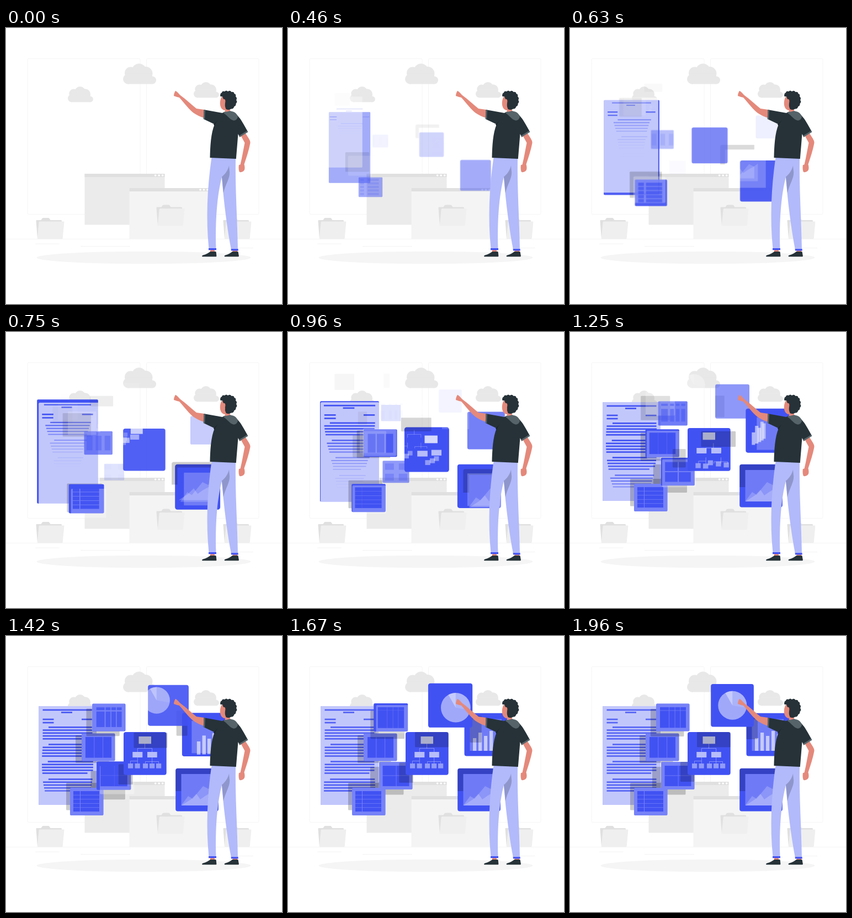
These frames come from a looping animation (500 px wide and 500 px high, 2 s). An HTML page:

```html
<!DOCTYPE html>
<html lang="en">
<head>
<meta charset="utf-8">
<title>Data panels</title>
<style>
html, body { margin: 0; width: 100%; height: 100%; overflow: hidden; background: #fff; }
svg { display: block; width: 100vw; height: 100vh; }
</style>
</head>
<body>
<svg viewBox="0 0 500 500" xmlns="http://www.w3.org/2000/svg">
  <defs>
    <g id="cloud">
      <circle cx="9" cy="28" r="9"/><circle cx="14" cy="17" r="11"/><circle cx="29" cy="13" r="13"/>
      <circle cx="41" cy="18" r="12.5"/><circle cx="53" cy="30" r="7"/>
      <rect x="8" y="18" width="45" height="19"/>
    </g>
    <g id="folder">
      <path fill="#e0e0e0" d="M54.5 349q0-1 1-1h8l2-3q.5-1 2-1h9q1.500 0 2 1l2 3h19q1.500 0 1.500 1.500l-3 31.500h-40q-1 0-1.200-1.200z"/>
      <path fill="#efefef" d="M61.500 350.500h43q1 0 .9 1.200l-2.700 29q-.2 1.300-1.500 1.300h-43.500q-1.200 0-1-1.300l3-29q.2-1.200 1.800-1.200z"/>
    </g>
  </defs>

  <g fill="none" stroke="#f5f5f5">
    <rect x="39" y="55.500" width="204" height="282" rx="2"/>
    <rect x="254.500" y="55.500" width="203.500" height="282" rx="2"/>
    <path stroke="#ebebeb" stroke-width=".6" d="M0 382.300H500M53 391H97M135 395.500H225M420 398.500H448"/>
  </g>
  <ellipse cx="249.500" cy="416" rx="194" ry="11.300" fill="#f5f5f5"/>
  <g fill="#e8e8e8">
    <use href="#cloud" x="212" y="64.500"/>
    <use href="#cloud" transform="translate(112 106) scale(.765)"/>
    <use href="#cloud" transform="translate(340 98) scale(.765)"/>
  </g>
  <path fill="#ebebeb" d="M142.500 264h145v92.500h-145z"/>
  <path fill="#e0e0e0" d="M142.500 264h145v6h-145z"/>
  <path fill="#f4f4f4" d="M223.500 290h145v92h-145z"/>
  <path fill="#e0e0e0" d="M223.500 290h145v6h-145z"/>
  <g fill="#fff">
    <circle cx="270.700" cy="267" r="1.800"/><circle cx="277.200" cy="267" r="1.800"/><circle cx="283.700" cy="267" r="1.800"/>
    <circle cx="352" cy="293" r="1.800"/><circle cx="358.500" cy="293" r="1.800"/><circle cx="365" cy="293" r="1.800"/>
  </g>
  <use href="#folder"/>
  <use href="#folder" x="218" y="-23.500"/>
  <use href="#folder" x="339"/>

  <g id="panels"></g>

  <g id="man">
    <path fill="#e4897b" d="M370 400h8v6h-8zM411 402h8v5h-8z"/>
    <path fill="#263238" d="M370 405h9.500q1 0 1.200 1l.7 7q0 1.200-1.200 1.200h-24.500q-1.500-1.700.8-2.500c6-1.600 9-3.200 13.500-6.700zM410 405h9.500q1 0 1.200 1l1.200 7q0 1.200-1.200 1.200h-24.500q-1.500-1.700.8-2.500c6-1.600 8.500-3.200 13-6.700z"/>
    <path fill="#b2bafb" d="M372.500 234C364.500 290 362 345 367.500 400H380.500C379 350 382 305 391 270C394 310 400 360 408 402H420C419 345 415 290 416 235z"/>
    <path fill="#8f96cb" d="M404 249.500C402 258 396 266 391 269.500L394 299C397 284 405 274 405.200 262z"/>
    <path fill="#4152f3" d="M367 399h14v3.200h-14zM407.500 400.200h13.200v3.400h-12.500z"/>
    <path fill="#e4897b" d="M426 196L434 191C439 199 443 204 442.500 208C440 222 435 236 431.500 247C433 252 433 257 430.500 259C427 261.500 423.500 262 422.500 260C421 255 421.500 251 422 248L424.500 247.500C428 233 430 220 432.500 208z"/>
    <path fill="#e4897b" d="M359 148L345 146C336 139 326 129 316 122C313 119 310 115.500 307 113.800C305.500 116 304 120 304 123C308 124.500 312 125.500 314 126C323 136 332 148 340 154C346 158 352 161 359 163z"/>
    <path fill="#263238" d="M358.500 148L392 154C397 150.500 404 149.500 410 152C417 155 420 159 424 164C430 173 435 182 438 188L423.500 197.500L420.500 192L416.800 237L369.500 235C370 215 371 190 378 174.500L358 165z"/>
    <path fill="#566469" d="M358.500 148l2.500.5-.8 17.300-2.700-1.100zM437 186l1.400 2.500-15 9.300-1.400-2.600z"/>
    <path fill="#1c262b" d="M384 167q-4 4-6 11l-2-3.500z"/>
    <path fill="#566469" d="M394 154C396 150 404 149 409 151C415 152 419 156 420 161C419 165 416 168 412 167.500C405 166 400 157 394 154z"/>
    <path fill="#e4897b" d="M391 124C387.500 130 387 138 389 143C390.500 147 394 149 397 149L396.500 152Q401 152 406 150L404 130z"/>
    <path fill="#263238" d="M388.500 124Q387 119 391 117Q392 113.500 396 115Q399 112 402 115Q406 112 408.500 116Q413 115 413.500 119Q417.500 120 416 124Q419.500 127 417 130.500Q420 134 416.500 137Q417 141 413.500 142Q412 147 408 146.500Q403 149.500 398.500 147Q396 142 397 137L392 124z"/>
    <ellipse cx="394.800" cy="133" rx="2.600" ry="4.200" fill="#e4897b"/>
  </g>
</svg>
<script>
const NS = 'http://www.w3.org/2000/svg';
const BLUE = '#4152f3', WHITE = '#fff', SHADE = .2;
const parts = [];

function make(parent, tag, attrs) {
  const el = document.createElementNS(NS, tag);
  for (const k in attrs) el.setAttribute(k, attrs[k]);
  return parent.appendChild(el);
}

// Registers a zoom-in about (x, y), starting after delay seconds.
function zoom(el, delay, x = 0, y = 0, alpha = 1) {
  parts.push({ el, delay, x, y, alpha });
  return el;
}

const group = (x, y) => zoom(make(document.getElementById('panels'), 'g', {}), 0, x, y);

const box = (g, [x1, y1, x2, y2], fill, rx = 0) =>
  make(g, 'rect', { x: x1, y: y1, width: x2 - x1, height: y2 - y1, fill, rx });

// Grows about its own centre.
const centred = (g, r, delay, fill = BLUE, rx = 0) =>
  zoom(box(g, r, fill, rx), delay, (r[0] + r[2]) / 2, (r[1] + r[3]) / 2);

// Grows from the stage corner.
const flown = (g, r, delay, fill, alpha, rx = 0) => zoom(box(g, r, fill, rx), delay, 0, 0, alpha);
const flownPath = (g, d, delay, fill, alpha) => zoom(make(g, 'path', { d, fill }), delay, 0, 0, alpha);
const shade = (g, r, delay) => flown(g, r, delay, '#000', SHADE, 1.5);

// Text document
const doc = group(111.7, 216.5);
const page = [59, 127, 164, 306];
centred(doc, page, 0, BLUE, 2);
flown(doc, page, 0, WHITE, .68, 2);
const lines = make(doc, 'g', {});
const line = (x1, x2, y, delay) => centred(lines, [x1, y - 1.3, x2, y + 1.3], delay);
line(66.5, 156.5, 134, .21);
line(100, 120, 138.500, .21);
line(66.5, 86.5, 151, .08);
line(137, 156.5, 151, .1);
line(66.5, 86.5, 157, .12);
let row = 0;
for (const top of [165.3, 196.5, 227.5, 259.5])
  for (let i = 0; i < 5; i++) {
    const short = top === 227.5 && i === 4;
    line(i ? 66.5 : 77, short ? 147 : 156.5, top + i * 5.25, .235 + .034 * row++);
  }

// Tables
const left = group(167.5, 224);
function table(x, y, delay, cols, rows) {
  const r = [x, y, x + 60.5, y + 50];
  centred(left, r, delay, BLUE, 2);
  flown(left, r, delay, WHITE, .28, 2);
  for (const [x1, x2] of cols)
    for (const [y1, y2] of rows) centred(left, [x1, y1, x2, y2], delay + .13);
}
shade(left, [109, 266, 169.5, 315.5], 0);
shade(left, [149, 237, 209.5, 287.5], .555);
table(116, 275, 0, [[122, 134], [135, 169]],
  [0, 1, 2, 3, 4].map(i => [281 + i * 7.55, 287.8 + i * 7.55]));
shade(left, [126, 180, 186.5, 230], .31);
table(137, 176.5, .31, [[144, 159.5], [160.3, 175.3], [176.1, 191]], [[183, 220.5]]);
table(165, 228, .555, [[171.5, 195.7], [196.5, 219.5]], [[235, 252.5], [253.3, 272]]);
shade(left, [200, 228, 225.500, 264], .7);
shade(left, [146, 132, 206.5, 182], .76);
table(156, 122.5, .76, [[163, 179.3], [180.1, 189.7], [190.5, 199.5], [200.3, 210]],
  [[129, 134.6], [135.4, 166.3]]);

// Charts
const right = group(305, 202);
const panel = (x, y, delay) => centred(right, [x, y, x + 77.7, y + 77.7], delay, BLUE, 4);

// Area chart
panel(307.2, 239.8, 0);
flownPath(right, 'M307.200 281V243.500Q307.200 240 311 240H379V250H317.500V281z', .13, '#000', SHADE);
flown(right, [317.5, 250, 375, 307], .05, WHITE, .24);
flownPath(right, 'M318 306L330 290L338 295L357 272L367 277L375 271V307H318z', .1, WHITE, .2);
flownPath(right, 'M318 307L335 296L345 286L352 296L362 289L375 282V307z', .12, WHITE, .22);

// Organisation chart
panel(213, 174, .16);
const wire = make(right, 'path', {
  d: 'M251.500 195V203.500M238.300 210V203.500H264.700V210M238.300 220V226.500M225.500 231V226.500H238.300V231M264.700 220V227.500M252.500 231V227.500H276.500V231M264.700 227.500V231',
  fill: 'none', stroke: WHITE, 'stroke-width': .7
});
zoom(wire, .43, 0, 0, .5);
flown(right, [240.5, 182, 263, 195.3], .176, WHITE, .78);
flown(right, [229.3, 210, 247.3, 220], .22, WHITE, .62);
flown(right, [256, 210, 273.8, 220], .25, WHITE, .62);
[248, 260, 272, 221, 233.5].forEach((x, i) =>
  flown(right, [x, 231, x + 9.2, 239.7], .285 + i * .03, WHITE, .42));
shade(right, [230, 174, 290.7, 201.5], .45);

// Bar chart
panel(319.5, 139.8, .48);
flown(right, [329.5, 150.5, 387, 208], .5, WHITE, .24);
[185, 175, 181, 172, 178].forEach((y, i) =>
  flown(right, [335 + i * 10, y, 341.2 + i * 10, 208], .62 + i * .02, WHITE, .6));
shade(right, [319.5, 140, 340, 187], .815);

// Pie chart
panel(255.2, 86.9, .84);
function wedge(a, b, alpha) {
  const pt = t => `${294.3 + 26 * Math.sin(t)} ${125.700 - 26 * Math.cos(t)}`;
  flownPath(right, `M294.300 125.700L${pt(a)}A26 26 0 0 1 ${pt(b)}z`, .87, WHITE, alpha);
}
zoom(make(right, 'circle', { cx: 294.3, cy: 125.7, r: 26, fill: WHITE }), .87, 0, 0, .5);
wedge(0, 1.75, .12);
wedge(-.52, 0, .4);

// cubic-bezier(.36, -.01, .5, 1.38)
const curve = (u, a, b) => 3 * (1 - u) * (1 - u) * u * a + 3 * (1 - u) * u * u * b + u * u * u;
function ease(x) {
  if (x <= 0) return 0;
  if (x >= 1) return 1;
  let lo = 0, hi = 1;
  for (let i = 0; i < 22; i++) {
    const u = (lo + hi) / 2;
    if (curve(u, .36, .5) < x) lo = u; else hi = u;
  }
  return curve(lo, -.01, 1.38);
}
const clamp = v => Math.max(0, Math.min(1, v));

function draw(ms) {
  const t = Math.floor((ms + 2) % 2000 * .024) / 24 + .016;
  for (const p of parts) {
    const e = ease(t - p.delay), s = .5 + e / 2;
    p.el.setAttribute('transform', `translate(${p.x * (1 - s)} ${p.y * (1 - s)}) scale(${s})`);
    p.el.setAttribute('opacity', p.alpha * clamp(e));
  }
  lines.setAttribute('opacity', 1 - .15 * clamp((t - 1.35) / .4));
}

const start = performance.now();
function tick() {
  draw(performance.now() - start);
  requestAnimationFrame(tick);
}
tick();
</script>
</body>
</html>
```
